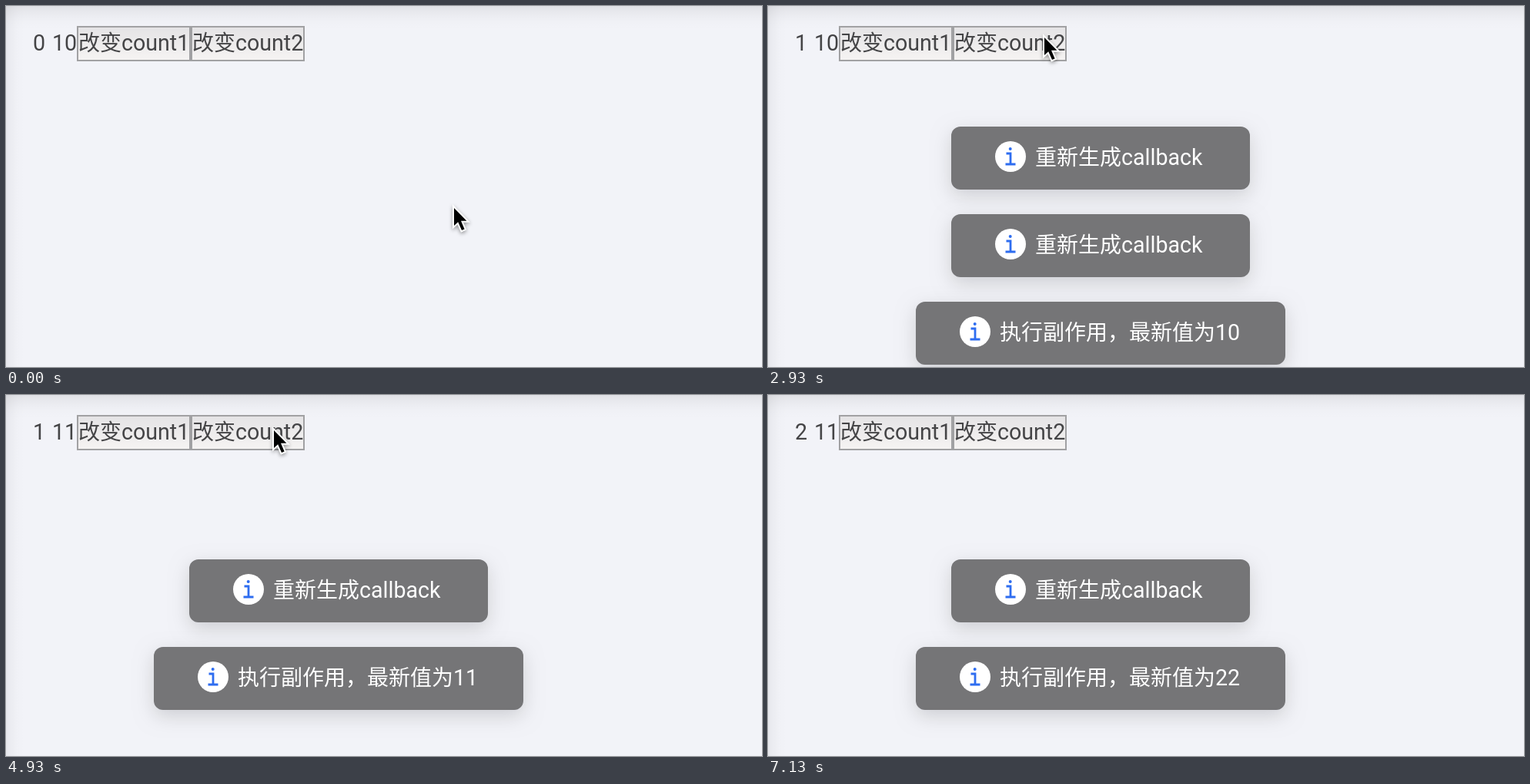
Write an HTML page with a canvas that moves like this. It is 982x470 px and loops after 7340 ms.

```html
<!DOCTYPE html>
<html lang="zh-CN">
<head>
<meta charset="utf-8">
<title>useCallback</title>
<style>
html, body { margin: 0; width: 100%; height: 100%; overflow: hidden; background: #f2f3f8; }
canvas { display: block; }
</style>
</head>
<body>
<canvas id="stage" width="982" height="470"></canvas>
<script>
const ctx = document.getElementById('stage').getContext('2d');
const W = 982, H = 470, LOOP = 7340, TICK = 1000 / 15;
const CENTER = { x: 432, y: 312 };
const BODY = 82, PAD = 16, FADE = 300, LIFE = 2065;
const BLANK = [260, 460];

const REGEN = '重新生成callback';
const effect = n => '执行副作用，最新值为' + n;
const toast = (text, start, end = start + LIFE) => ({ text, start, end, w: text === REGEN ? 388 : 480 });

// The pointer rests on the first toast, so that one closes later.
const toasts = [
  toast(REGEN, 470, 3200),
  toast(effect(10), 470),
  toast(REGEN, 2297),
  toast(effect(10), 2297),
  toast(REGEN, 3895),
  toast(effect(11), 3895),
  toast(REGEN, 5900),
  toast(effect(22), 5900)
];

// start, end, x, y
const moves = [
  [0, 0, 582, 263],
  [1130, 1340, 168, 50],
  [2400, 2870, 359, 41],
  [2950, 3300, 348, 46],
  [5200, 5750, 166, 52]
];
const POINTER_GONE = 6725;

const clamp = v => Math.max(0, Math.min(1, v));

function bezier(x1, y1, x2, y2) {
  const at = (s, a, b) => 3 * s * (1 - s) ** 2 * a + 3 * s * s * (1 - s) * b + s ** 3;
  return x => {
    if (x <= 0 || x >= 1) return clamp(x);
    let lo = 0, hi = 1;
    for (let i = 0; i < 24; i++) {
      const mid = (lo + hi) / 2;
      if (at(mid, x1, x2) < x) lo = mid; else hi = mid;
    }
    return at(lo, y1, y2);
  };
}
const easeEnter = bezier(0.08, 0.82, 0.17, 1);
const easeLeave = bezier(0.6, 0.04, 0.98, 0.34);

// Latin and Chinese runs use their own faces.
function write(text, x, y, color) {
  ctx.fillStyle = color;
  for (const run of text.match(/[\x00-\x7f]+|[^\x00-\x7f]+/g)) {
    ctx.font = run.charCodeAt(0) < 128
      ? '28.6px Roboto, sans-serif'
      : '28px "Noto Sans CJK SC", "Noto Sans CJK", sans-serif';
    ctx.fillText(run, x, y);
    x += ctx.measureText(run).width;
  }
}

function edge(x1, y1, alpha) {
  const g = ctx.createLinearGradient(0, 0, x1, y1);
  for (let i = 0; i <= 5; i++) {
    g.addColorStop(i / 5, `rgba(0,0,0,${alpha * (1 - i / 5) ** 2})`);
  }
  ctx.fillStyle = g;
  ctx.fillRect(0, 0, W, H);
}

function button(x, label) {
  const g = ctx.createLinearGradient(0, 26, 0, 72);
  g.addColorStop(0, '#e4e3e5');
  g.addColorStop(1, '#f6f4f3');
  ctx.fillStyle = g;
  ctx.fillRect(x, 26, 148, 46);
  ctx.strokeStyle = '#a1a1a3';
  ctx.lineWidth = 2;
  ctx.strokeRect(x + 1, 27, 146, 44);
  write(label, x + 2, 58, '#444446');
}

function drawPage(t) {
  ctx.fillStyle = '#f2f3f8';
  ctx.fillRect(0, 0, W, H);
  edge(0, 32, 0.075);
  edge(25, 0, 0.05);
  const count1 = t < 2297 ? 0 : t < 5900 ? 1 : 2;
  const count2 = t < 3895 ? 10 : 11;
  write(String(count1), 35, 58, '#444446');
  write(String(count2), 60, 58, '#444446');
  button(92, '改变count1');
  button(240, '改变count2');
}

function infoIcon(x, y) {
  ctx.fillStyle = '#fff';
  ctx.beginPath();
  ctx.arc(x, y, 20, 0, Math.PI * 2);
  ctx.fill();
  ctx.strokeStyle = ctx.fillStyle = '#2e6df0';
  ctx.lineWidth = 2.8;
  ctx.beginPath();
  ctx.moveTo(x - 5.5, y - 4);
  ctx.lineTo(x, y - 4);
  ctx.lineTo(x, y + 10);
  ctx.moveTo(x - 6.5, y + 10);
  ctx.lineTo(x + 6.5, y + 10);
  ctx.stroke();
  ctx.beginPath();
  ctx.arc(x - 0.3, y - 10, 2, 0, Math.PI * 2);
  ctx.fill();
}

function drawToast(item, y) {
  const left = CENTER.x - item.w / 2;
  ctx.save();
  if (item.out > 0) {
    ctx.beginPath();
    ctx.rect(0, y, W, item.h);
    ctx.clip();
  }
  ctx.globalAlpha = item.in * (1 - item.out);
  ctx.translate(0, y + item.pad - (1 - item.in) * item.h - item.out * 8);
  ctx.save();
  ctx.shadowColor = 'rgba(0,0,0,0.15)';
  ctx.shadowBlur = 24;
  ctx.shadowOffsetY = 8;
  ctx.fillStyle = '#757577';
  ctx.beginPath();
  ctx.roundRect(left, 0, item.w, BODY, 12);
  ctx.fill();
  ctx.restore();
  infoIcon(left + 77, 39);
  write(item.text, left + 109, 50, '#fff');
  ctx.restore();
}

function drawToasts(t) {
  const live = toasts.filter(m => t >= m.start && t < m.end + FADE).map(m => {
    const out = easeLeave((t - m.end) / FADE);
    const pad = PAD * (1 - out);
    return {
      ...m, out, pad,
      in: easeEnter((t - m.start) / FADE),
      h: Math.min(BODY + 2 * pad, 300 * (1 - out))
    };
  });
  let y = CENTER.y - live.reduce((sum, m) => sum + m.h, 0) / 2;
  for (const m of live) {
    drawToast(m, y);
    y += m.h;
  }
}

function drawPointer(t) {
  if (t >= POINTER_GONE) return;
  let [, , x, y] = moves[0];
  for (const [start, end, tx, ty] of moves.slice(1)) {
    const k = 1 - (1 - clamp((t - start) / (end - start))) ** 2;
    x += (tx - x) * k;
    y += (ty - y) * k;
  }
  const shape = new Path2D('M0 0V23L5.2 18.2L10 29L13.6 27.4L9 16.8H16.4Z');
  ctx.save();
  ctx.translate(x, y);
  ctx.lineWidth = 4;
  ctx.strokeStyle = '#fff';
  ctx.shadowColor = 'rgba(0,0,0,0.4)';
  ctx.shadowBlur = 5;
  ctx.shadowOffsetY = 2;
  ctx.stroke(shape);
  ctx.shadowColor = 'transparent';
  ctx.fillStyle = '#000';
  ctx.fill(shape);
  ctx.restore();
}

function draw(t) {
  if (t >= BLANK[0] && t < BLANK[1]) {
    ctx.fillStyle = '#fff';
    ctx.fillRect(0, 0, W, H);
  } else {
    drawPage(t);
    drawToasts(t);
  }
  drawPointer(t);
}

const begin = performance.now();
function loop() {
  const t = (performance.now() - begin) % LOOP;
  draw(Math.floor((t + 5) / TICK) * TICK);
  requestAnimationFrame(loop);
}
loop();
</script>
</body>
</html>
```
